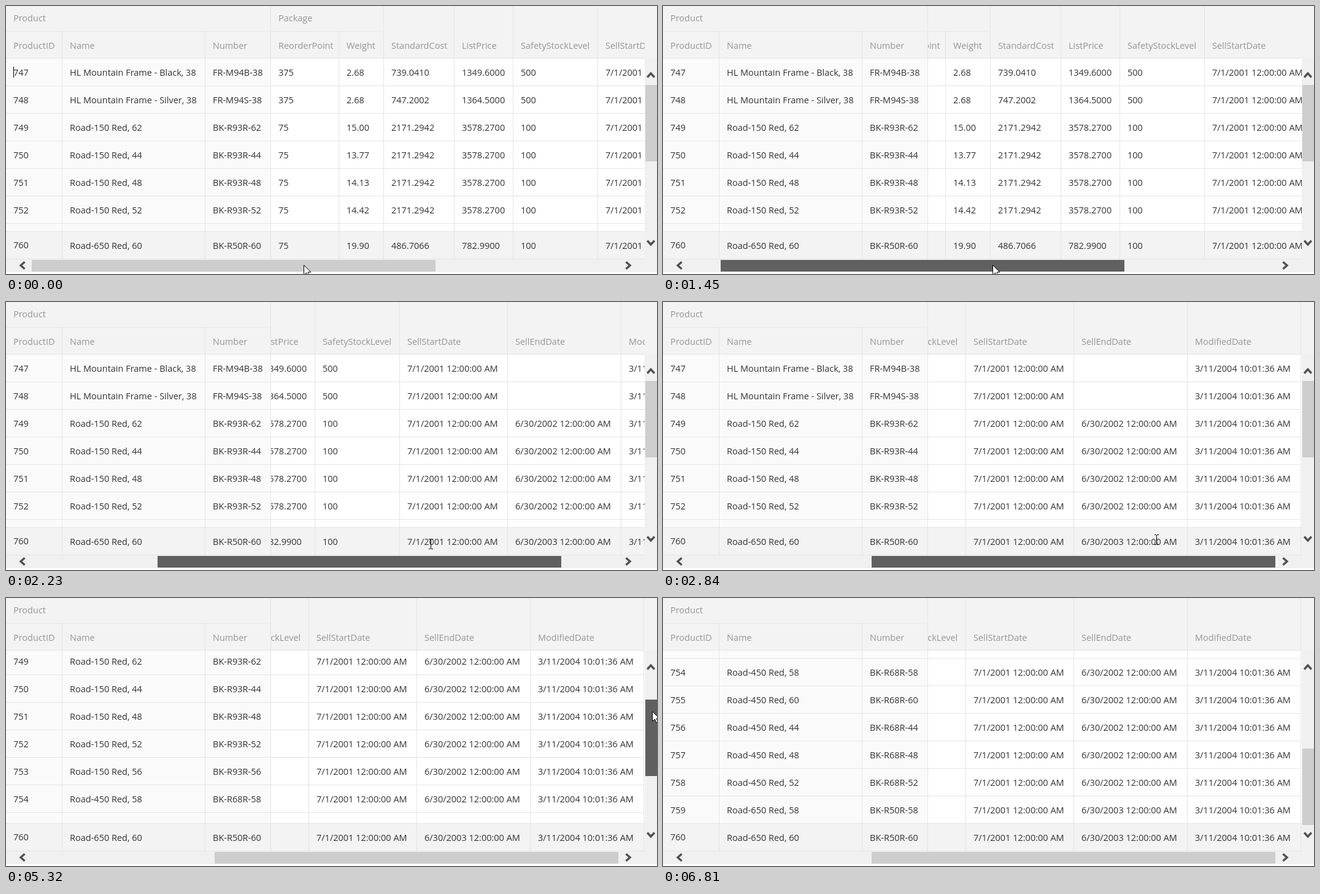
These frames come from a looping animation (1061x438 px, 8070 ms). An HTML page with a canvas:

```html
<!DOCTYPE html>
<html lang="en">
<head>
<meta charset="utf-8">
<title>Scrolling data grid</title>
<style>
html, body { margin: 0; width: 100%; height: 100%; overflow: hidden; background: #fff; }
canvas { display: block; }
</style>
</head>
<body>
<canvas id="stage" width="1061" height="438"></canvas>
<script>
const ctx = document.getElementById('stage').getContext('2d');
const LOOP = 8070;
const ROW = 45, HEAD = 85, FOOT = 368, BOTTOM = 413, FIXED = 431, RIGHT = 1041;
const H_MAX = 298, H_SCROLL = 471, V_MAX = 117, V_SCROLL = 302;
const COLOR = {
  head: '#f3f3f3', fixed: '#fafafa', line: '#e5e5e5', track: '#f0f0f0',
  thumb: '#cdcdcd', pressed: '#606060', arrow: '#505050', text: '#333', label: '#959595'
};

// Bursts of screen updates: [first, last, count]
const BURSTS = [
  [0, 0, 1], [360, 520, 3], [900, 1680, 11], [1770, 2530, 11], [2610, 3070, 7],
  [3540, 4320, 11], [4400, 4480, 2], [5090, 5700, 9], [5790, 5870, 2], [5960, 6110, 3]
];

// Pointer path: [time, x, y]
const PATH = [
  [0, 485, 423], [822, 485, 423], [900, 488, 423], [1140, 502, 423], [1446, 537, 423],
  [1680, 581, 414], [2226, 689.6, 395], [2530, 735, 391], [2840, 802, 388], [3070, 824, 391],
  [3462, 824, 391], [3618, 842, 371], [4162, 1041, 170], [4242, 1055, 157], [4320, 1070, 152],
  [4400, 1055, 147], [4480, 1050, 145], [5012, 1050, 145], [5090, 1050, 151],
  [5700, 1058, 241], [5790, 1070, 252], [5870, 1075, 260], [6110, 1075, 266]
];

const FIXED_COLS = [[0, 'ProductID'], [91, 'Name'], [324, 'Number']];
const COLS = [
  [431, 'ReorderPoint'], [542, 'Weight'], [615, 'StandardCost'], [730, 'ListPrice'],
  [826, 'SafetyStockLevel'], [964, 'SellStartDate'], [1140, 'SellEndDate'], [1325, 'ModifiedDate']
];
const COLS_END = 1510, PACKAGE_END = 615;

const MODELS = {
  black: ['HL Mountain Frame - Black', 'FR-M94B', '375', '739.0410', '1349.6000', '500', 0],
  silver: ['HL Mountain Frame - Silver', 'FR-M94S', '375', '747.2002', '1364.5000', '500', 0],
  r150: ['Road-150 Red', 'BK-R93R', '75', '2171.2942', '3578.2700', '100', 2002],
  r450: ['Road-450 Red', 'BK-R68R', '75', '884.7083', '1457.9900', '100', 2002],
  r650: ['Road-650 Red', 'BK-R50R', '75', '486.7066', '782.9900', '100', 2003]
};
const ROWS = [
  ['black', 38, '2.68'], ['silver', 38, '2.68'],
  ['r150', 62, '15.00'], ['r150', 44, '13.77'], ['r150', 48, '14.13'],
  ['r150', 52, '14.42'], ['r150', 56, '14.68'],
  ['r450', 58, '17.79'], ['r450', 60, '17.90'], ['r450', 44, '16.77'],
  ['r450', 48, '17.13'], ['r450', 52, '17.42'],
  ['r650', 58, '19.79'], ['r650', 60, '19.90']
].map(([key, size, weight], i) => {
  const [name, code, reorder, cost, price, stock, year] = MODELS[key];
  return {
    fixed: [String(747 + i), `${name}, ${size}`, `${code}-${size}`],
    cells: [reorder, weight, cost, price, stock, '7/1/2001 12:00:00 AM',
      year ? `6/30/${year} 12:00:00 AM` : '', '3/11/2004 10:01:36 AM']
  };
});
const LAST = ROWS[ROWS.length - 1];

const clamp = (v, lo, hi) => Math.min(hi, Math.max(lo, v));

function snap(t) {
  const [a, b, n] = BURSTS.filter(s => s[0] <= t).pop();
  if (n === 1) return a;
  const step = (b - a) / (n - 1);
  return a + step * Math.min(n - 1, Math.floor((t - a + 1) / step));
}

function pointerAt(t) {
  const i = PATH.findIndex(p => p[0] > t);
  if (i < 0) return PATH[PATH.length - 1].slice(1);
  const [t0, x0, y0] = PATH[i - 1], [t1, x1, y1] = PATH[i];
  const k = (t - t0) / (t1 - t0);
  return [x0 + (x1 - x0) * k, y0 + (y1 - y0) * k];
}

function rect(x, y, w, h, color) {
  ctx.fillStyle = color;
  ctx.fillRect(x, y, w, h);
}

const hLine = (x0, x1, y) => rect(x0, y, x1 - x0, 1, COLOR.line);
const vLine = (x, y0, y1) => rect(x, y0, 1, y1 - y0, COLOR.line);

function text(str, x, y, color = COLOR.text) {
  ctx.fillStyle = color;
  ctx.fillText(str, x, y);
}

function clipped(x0, y0, x1, y1, draw) {
  ctx.save();
  ctx.beginPath();
  ctx.rect(x0, y0, x1 - x0, y1 - y0);
  ctx.clip();
  draw();
  ctx.restore();
}

function drawHeader(sx) {
  rect(0, 0, 1061, HEAD, COLOR.head);
  clipped(FIXED + 1, 0, RIGHT, HEAD, () => {
    text('Package', FIXED + 13 - sx, 25, COLOR.label);
    hLine(FIXED - sx, PACKAGE_END - sx, 41);
    for (const [x, label] of COLS) {
      text(label, x + 13 - sx, 70, COLOR.label);
      vLine(x - sx, x < PACKAGE_END ? 41 : 0, HEAD);
    }
    vLine(COLS_END - sx, 0, HEAD);
  });
  text('Product', 12, 25, COLOR.label);
  hLine(0, FIXED, 41);
  for (const [x, label] of FIXED_COLS) {
    text(label, x ? x + 13 : 12, 70, COLOR.label);
    if (x) vLine(x, 41, HEAD);
  }
  vLine(FIXED, 0, HEAD);
  hLine(0, RIGHT, HEAD);
}

function drawCells(row, y, sx, idShift = 0) {
  row.fixed.forEach((s, i) => {
    const x = FIXED_COLS[i][0];
    text(s, x ? x + 13 : 12, i ? y : y - idShift);
  });
  clipped(FIXED + 1, HEAD, RIGHT, BOTTOM, () =>
    row.cells.forEach((s, i) => text(s, COLS[i][0] + 13 - sx, y)));
}

function drawColumnLines(y0, y1, sx) {
  for (const x of [91, 324, FIXED]) vLine(x, y0, y1);
  clipped(FIXED + 1, y0, RIGHT, y1, () => {
    for (const [x] of COLS) vLine(x - sx, y0, y1);
    vLine(COLS_END - sx, y0, y1);
  });
}

function drawBody(sx, sy) {
  clipped(0, HEAD + 1, RIGHT, FOOT, () => {
    rect(0, HEAD, RIGHT, FOOT - HEAD, '#fff');
    rect(0, HEAD, FIXED, FOOT - HEAD, COLOR.fixed);
    ROWS.forEach((row, i) => {
      const top = HEAD + i * ROW - sy;
      if (top > FOOT || top + ROW < HEAD) return;
      drawCells(row, top + 29, sx);
      hLine(0, Math.min(RIGHT, COLS_END - sx), top + ROW);
    });
    drawColumnLines(HEAD, FOOT, sx);
  });
  rect(0, FOOT, RIGHT, BOTTOM - FOOT, COLOR.head);
  drawCells(LAST, FOOT + 29, sx, 1);
  drawColumnLines(FOOT, BOTTOM, sx);
  hLine(0, RIGHT, FOOT);
  hLine(0, RIGHT, BOTTOM);
}

function chevron(x, y, dx, dy) {
  // (dx, dy) is the direction in which it points
  ctx.beginPath();
  ctx.moveTo(x - dx * 3.5 - dy * 5.8, y - dy * 3.5 - dx * 5.8);
  ctx.lineTo(x + dx * 3, y + dy * 3);
  ctx.lineTo(x - dx * 3.5 + dy * 5.8, y - dy * 3.5 + dx * 5.8);
  ctx.strokeStyle = COLOR.arrow;
  ctx.lineWidth = 3.4;
  ctx.stroke();
}

function drawBars(hx, vy, hDown, vDown) {
  rect(RIGHT, HEAD, 20, 350, COLOR.track);
  rect(0, BOTTOM + 1, 1061, 21, COLOR.track);
  rect(42 + Math.round(hx), 415, 658, 19, hDown ? COLOR.pressed : COLOR.thumb);
  rect(1042, 129 + Math.round(vy), 19, 125, vDown ? COLOR.pressed : COLOR.thumb);
  chevron(27, 424, -1, 0);
  chevron(1014, 424, 1, 0);
  chevron(1051, 113, 0, -1);
  chevron(1051, 387, 0, 1);
}

function drawArrow(x, y) {
  const shape = [[0, 0], [0, 16], [4, 12.5], [6.5, 18.5], [9, 17.5], [6.5, 11.5], [11.5, 11.5]];
  ctx.beginPath();
  shape.forEach(([dx, dy]) => ctx.lineTo(x + 0.5 + dx, y + 0.5 + dy));
  ctx.closePath();
  ctx.fillStyle = '#fff';
  ctx.fill();
  ctx.strokeStyle = '#000';
  ctx.lineWidth = 1;
  ctx.stroke();
}

function drawBeam(x, y) {
  rect(x, y - 7, 1, 15, '#000');
  for (const end of [y - 8, y + 8]) {
    rect(x - 3, end, 3, 1, '#000');
    rect(x + 1, end, 3, 1, '#000');
  }
}

function draw(t) {
  const s = snap(t);
  const [x, y] = pointerAt(s);
  const hx = clamp(x - 485, 0, H_MAX);
  const vy = s > 5000 ? clamp(y - 148, 0, V_MAX) : 0;
  const sx = Math.round(hx * H_SCROLL / H_MAX);
  const sy = Math.round(vy * V_SCROLL / V_MAX);

  rect(0, 0, 1061, 438, '#fff');
  ctx.font = '14.5px "Open Sans", "Noto Sans", sans-serif';
  drawHeader(sx);
  drawBody(sx, sy);
  drawBars(hx, vy, t >= 670 && t < 3390, t >= 4780 && t < 6810);

  const caret = s < 360 ? 1 : clamp((520 - s) / 240, 0, 1);
  if (caret) rect(12, 99, 1, 18, `rgba(0,0,0,${caret})`);

  const px = Math.round(x), py = Math.round(y);
  if (px >= RIGHT || py >= BOTTOM) drawArrow(px, py);
  else drawBeam(px + 2, py);
}

const start = performance.now();
function tick() {
  draw((performance.now() - start) % LOOP);
  requestAnimationFrame(tick);
}
tick();
</script>
</body>
</html>
```
